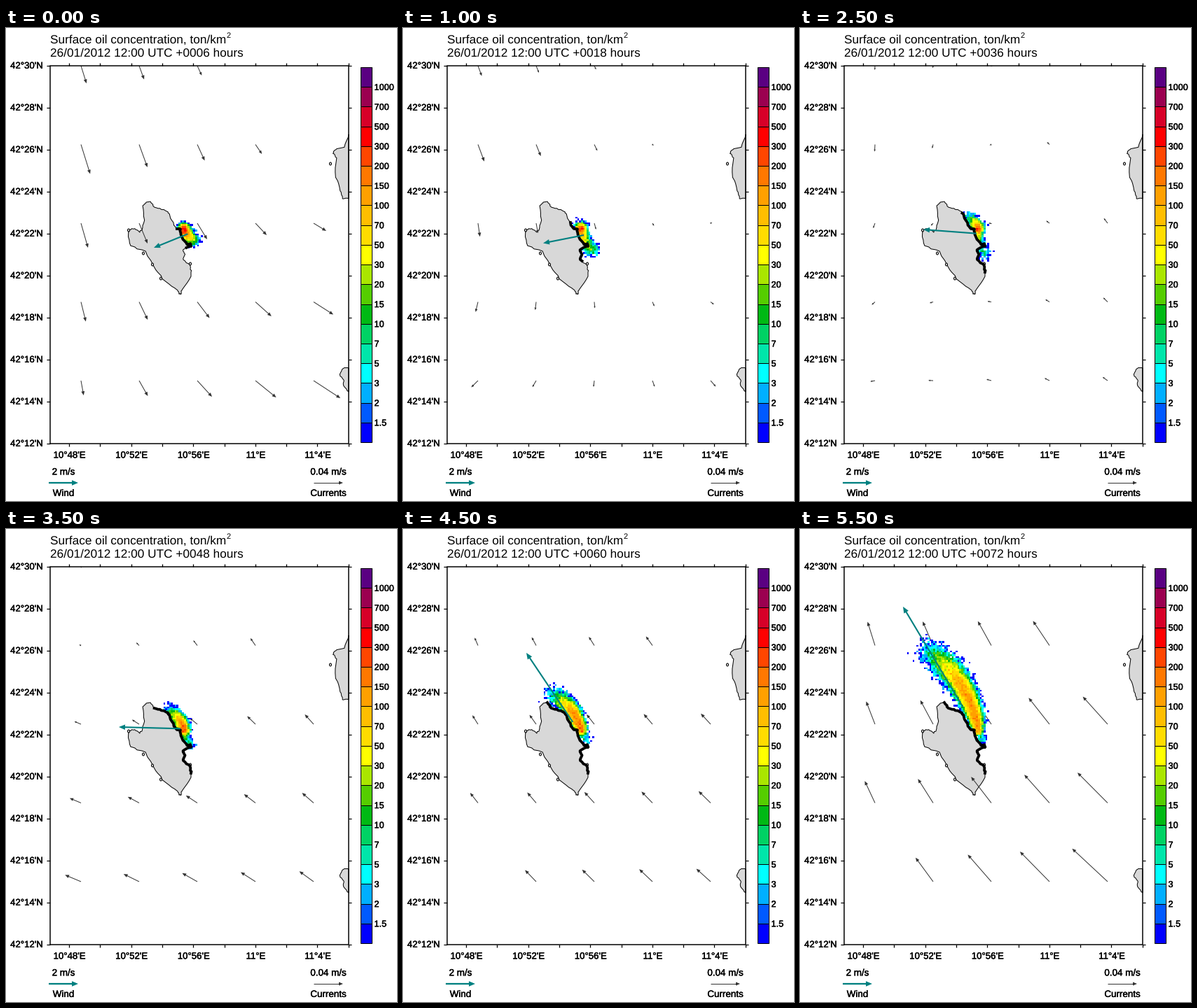
Recreate the animation shown at these times as a matplotlib script. Size 558x676 px, loop 6000 ms.

```python
import numpy as np
import matplotlib.pyplot as plt
from matplotlib.animation import FuncAnimation
from matplotlib.collections import LineCollection, PolyCollection
from matplotlib.colors import to_rgba_array
from matplotlib.patches import Ellipse, Polygon, Rectangle
from matplotlib.path import Path
from matplotlib.patheffects import withStroke

plt.rcParams["font.family"] = "Liberation Sans"
plt.rcParams["text.hinting"] = "none"

W, H, DPI = 558, 676, 100
PX = 72 / DPI  # points per pixel
LEFT, RIGHT, TOP, BOTTOM = 63, 489, 54, 594
TEAL, DARK, LAND = "#008080", "#333333", "#d8d8d8"

LEVELS = [1.5, 2, 3, 5, 7, 10, 15, 20, 30, 50, 70, 100, 150, 200, 300, 500, 700, 1000]
COLORS = ["#0000ff", "#005aff", "#00afff", "#00ffff", "#00e6aa", "#00d264", "#00b914",
          "#55cd00", "#aae600", "#ffff00", "#ffdc00", "#ffbe00", "#ffa000", "#ff7800",
          "#ff4600", "#ff0000", "#d70028", "#9b0050", "#5a0082"]

EAST = [(206, 248), (212, 256), (222, 258), (229, 262), (234, 268), (240, 282), (244, 287),
        (249, 287), (249, 295), (257, 308), (264, 309), (264, 312), (252, 317), (255, 323),
        (253, 331), (262, 339), (264, 349)]
WEST = [(264, 355), (251, 374), (250, 380), (247, 380), (245, 375), (228, 363), (213, 345),
        (199, 319), (178, 311), (174, 295), (176, 289), (184, 286), (190, 291), (194, 289),
        (197, 275), (195, 254), (200, 249)]
NORTH_CAPE = [(489, 152), (482, 170), (469, 174), (467, 179), (471, 186), (470, 213),
              (478, 232), (480, 244), (489, 244)]
SOUTH_CAPE = [(489, 486), (481, 486), (476, 495), (482, 503), (481, 511), (489, 520)]
ISLETS = [(196, 322), (209, 338), (221, 358), (263, 337), (175, 289), (463, 194)]

# Key states, with positions and vectors as x + y*1j in pixels.
HOURS = [6, 12, 24, 36, 48, 60, 72]
WIND_TIP = [211 + 314j, 217 + 318j, 183 + 297j, 176 + 288j, 161 + 283j, 176 + 177j, 147 + 111j]
NORTH_TIP = [258 + 292j, 257 + 289j, 245 + 278j, 240 + 271j, 232 + 260j, 213 + 237j, 184 + 176j]
SOUTH_TIP = [266 + 303j, 271 + 313j, 267 + 320j, 261 + 322j, 261 + 308j, 260 + 303j, 260 + 300j]
SOURCE = 254 + 288j

# Current at the grid centre, its change per column, per row, and the cross term.
FLOW_MEAN = [14 + 23j, 5 + 16j, 2j, -4, -11 - 9j, -11 - 14j, -24 - 36j]
FLOW_COL = [2 - 6j, 1.4 - 5j, -1.7 - 5.3j, -0.7 - 3.6j, -0.8 - 2.5j, -1.5 - 0.6j, -5.7 - 1.7j]
FLOW_ROW = [3.5, -2.4, -1.2, -1.5 - 1j, -5.3 - 1.6j, -3.2 - 1.6j, -4.8 - 1.3j]
FLOW_TWIST = [3.3 + 3.5j, 2.9 + 3.4j, 1.5 + 1.5j, 0.3 + 1j, 0.7 + 0.6j, 0, -1.4 - 1.3j]

col, row = np.meshgrid(np.arange(5), np.arange(5))
NODES = 107 + 83 * col + 1j * (54 + 112.5 * row)


def at(hour, values):
    return np.interp(hour, HOURS, np.array(values, complex))


def xy(z):
    return np.column_stack([np.real(z).ravel(), np.imag(z).ravel()])


def rough(points, rng=np.random.default_rng(4)):
    points = np.array(points, float)
    t = np.linspace(0, len(points) - 1, 4 * len(points) - 3)
    line = np.column_stack([np.interp(t, range(len(points)), c) for c in points.T])
    line[1:-1] += rng.normal(0, 0.5, (len(line) - 2, 2))
    return line


fig = plt.figure(figsize=(W / DPI, H / DPI), dpi=DPI, facecolor="white")
ax = fig.add_axes([0, 0, 1, 1])
ax.axis("off")


def label(x, y, text, size=13.2, **kw):
    return ax.text(x, y, text, fontsize=size * PX, color="black", **kw)


def small_label(x, y, text, size=13.2, **kw):
    label(x, y, text, size, va="center",
          path_effects=[withStroke(linewidth=0.3, foreground="black")], **kw)


class Arrows:
    def __init__(self, color, width, z, clip=None):
        self.lines = LineCollection([], colors=color, linewidths=width * PX, zorder=z)
        self.heads = PolyCollection([], facecolors=color, edgecolors="none", zorder=z)
        for part in (self.lines, self.heads):
            ax.add_collection(part, autolim=False)
            if clip is not None:
                part.set_clip_path(clip)

    def draw(self, tails, vectors, smallest, largest):
        lines, heads = [], []
        for tail, vec in zip(np.ravel(tails), np.ravel(vectors)):
            length = abs(vec)
            if length < 1.5:
                continue
            size = np.clip(0.3 * length, smallest, largest)
            tip, back = tail + vec, vec / length * size
            lines.append(xy(np.array([tail, tip - back * min(0.7, length / size)])))
            heads.append(xy(tip - back * np.array([0, 1 + 0.42j, 1 - 0.42j])))
        self.lines.set_segments(lines)
        self.heads.set_verts(heads)


# Land
coast = rough(EAST)
island = np.vstack([coast, rough(WEST)])
for shape in (island, rough(NORTH_CAPE), rough(SOUTH_CAPE)):
    ax.add_patch(Polygon(shape, fc=LAND, ec="black", lw=PX, zorder=1))
for centre in ISLETS:
    ax.add_patch(Ellipse(centre, 3, 4, fc=LAND, ec="black", lw=PX, zorder=1))

# Map frame, ticks and labels
frame_box = Rectangle((LEFT, TOP), RIGHT - LEFT, BOTTOM - TOP, fc="none", ec="black",
                      lw=1.5 * PX, zorder=8)
ax.add_patch(frame_box)
ticks = []
for k in range(10):
    y = TOP + 60 * k
    x = 90 + 44.3 * k
    ticks += [[(LEFT - 5, y), (LEFT, y)], [(RIGHT, y), (RIGHT + 4, y)],
              [(x, TOP - 4), (x, TOP)], [(x, BOTTOM), (x, BOTTOM + 4)]]
    small_label(53, y + 0.5, f"42°{30 - 2 * k}'N", ha="right")
ax.add_collection(LineCollection(ticks, colors="black", linewidths=1.3 * PX, zorder=8),
                  autolim=False)
for k, name in enumerate(["10°48'E", "10°52'E", "10°56'E", "11°E", "11°4'E"]):
    small_label(90.7 + 88.6 * k, 611, name, ha="center")

# Colour scale
step = (592 - 56) / len(COLORS)
for k, color in enumerate(COLORS):
    y = 592 - step * (k + 1)
    ax.add_patch(Rectangle((506, y), 16, step, fc=color, ec="black", lw=PX, zorder=2))
    if k < len(LEVELS):
        small_label(525.5, y + 1.2, f"{LEVELS[k]:g}", 12.7)

# Titles and arrow keys
label(63, 21.5, "Surface oil concentration, ton/km", 17.25)
label(314, 13.5, "2", 11)
title = label(63, 40.5, "", 17.25)
for x, speed, name in ((82, "2 m/s", "Wind"), (460, "0.04 m/s", "Currents")):
    small_label(x, 635, speed, 13.4, ha="center")
    small_label(x, 665.5, name, 13.4, ha="center")
Arrows(TEAL, 2.3, 9).draw(61 + 650j, 42, 9, 9)
Arrows(DARK, 1, 9).draw(439 + 650j, 42, 6, 6)

# Slick raster
CELL, X0, Y0, COLS, ROWS = 2.66, 150, 140, 57, 84
gx, gy = np.meshgrid(X0 + CELL * (np.arange(COLS) + 0.5), Y0 + CELL * (np.arange(ROWS) + 0.5))
cells = gx + 1j * gy
on_land = Path(island).contains_points(xy(cells)).reshape(cells.shape)
palette = to_rgba_array(COLORS)
raster = ax.imshow(np.zeros((ROWS, COLS, 4)), interpolation="nearest", aspect="auto",
                   extent=(X0, X0 + CELL * COLS, Y0 + CELL * ROWS, Y0), zorder=4)
oil_line, = ax.plot([], [], color="black", lw=3.8 * PX, zorder=5)
currents = Arrows(DARK, 1, 3, frame_box)
wind = Arrows(TEAL, 2.1, 6)

ax.set_xlim(0, W)
ax.set_ylim(H, 0)


def arm(hour, tip, falloff):
    """Bowed plume from the source to a tip, widening and thinning on the way."""
    span = tip - SOURCE
    peak, tip_peak = 400 - 3.6 * hour, 4 + 60 * np.exp(-hour / 10)
    mean = np.zeros(cells.shape)
    for s in np.linspace(0, 1, 33):
        centre = SOURCE + span * s * (1 + 0.4j * (1 - s))
        spread = 3.3 + 0.042 * abs(span) * s ** 0.7
        height = peak * (tip_peak / peak) ** (s ** falloff)
        mean = np.maximum(mean, height * np.exp(-abs(cells - centre) ** 2 / (2 * spread ** 2)))
    return mean


def slick_image(hour, north, south):
    mean = np.maximum(arm(hour, north, max(1, (hour / 36) ** 2)),
                      arm(hour, south, (6 / hour) ** 0.5))
    # Whole particles per cell leave ragged, speckled edges.
    rng = np.random.default_rng(hour)
    mean *= rng.lognormal(0, 0.15, mean.shape)
    amount = 1.2 * rng.poisson(mean / 1.2)
    image = palette[np.searchsorted(LEVELS, amount, side="right")]
    image[(amount == 0) | on_land, 3] = 0
    return image


def current_field(hour):
    c, r = col - 2, np.maximum(row, 1) - 2
    mean, per_col, per_row, twist = (at(hour, v) for v in
                                     (FLOW_MEAN, FLOW_COL, FLOW_ROW, FLOW_TWIST))
    flow = mean + per_col * c + per_row * r + twist * c * r
    flow = np.where(row == 0, 0.6 * flow, flow)  # weaker along the northern edge
    sheltered = (col - row >= 3) | ((row - col >= 4) & (hour > 48))
    return np.where(sheltered, 0, flow)


def update(frame):
    hour = 6 * (frame + 1)
    title.set_text(f"26/01/2012 12:00 UTC +{hour:04d} hours")
    currents.draw(NODES, current_field(hour), 2.8, 5.8)
    north, south = at(hour, NORTH_TIP), at(hour, SOUTH_TIP)
    tail = (SOURCE + north + south) / 3
    wind.draw(tail, at(hour, WIND_TIP) - tail, 9, 9)
    # The oiled shore spreads both ways from the first landfall.
    low, high = max(247, 291 - 0.75 * hour), min(350, 306 + 1.5 * hour)
    reached = coast[(coast[:, 1] >= low) & (coast[:, 1] <= high)]
    oil_line.set_data(reached[:, 0], reached[:, 1])
    raster.set_data(slick_image(hour, north, south))
    return ()


animation = FuncAnimation(fig, update, frames=12, interval=500, repeat=True)
plt.show()
```
